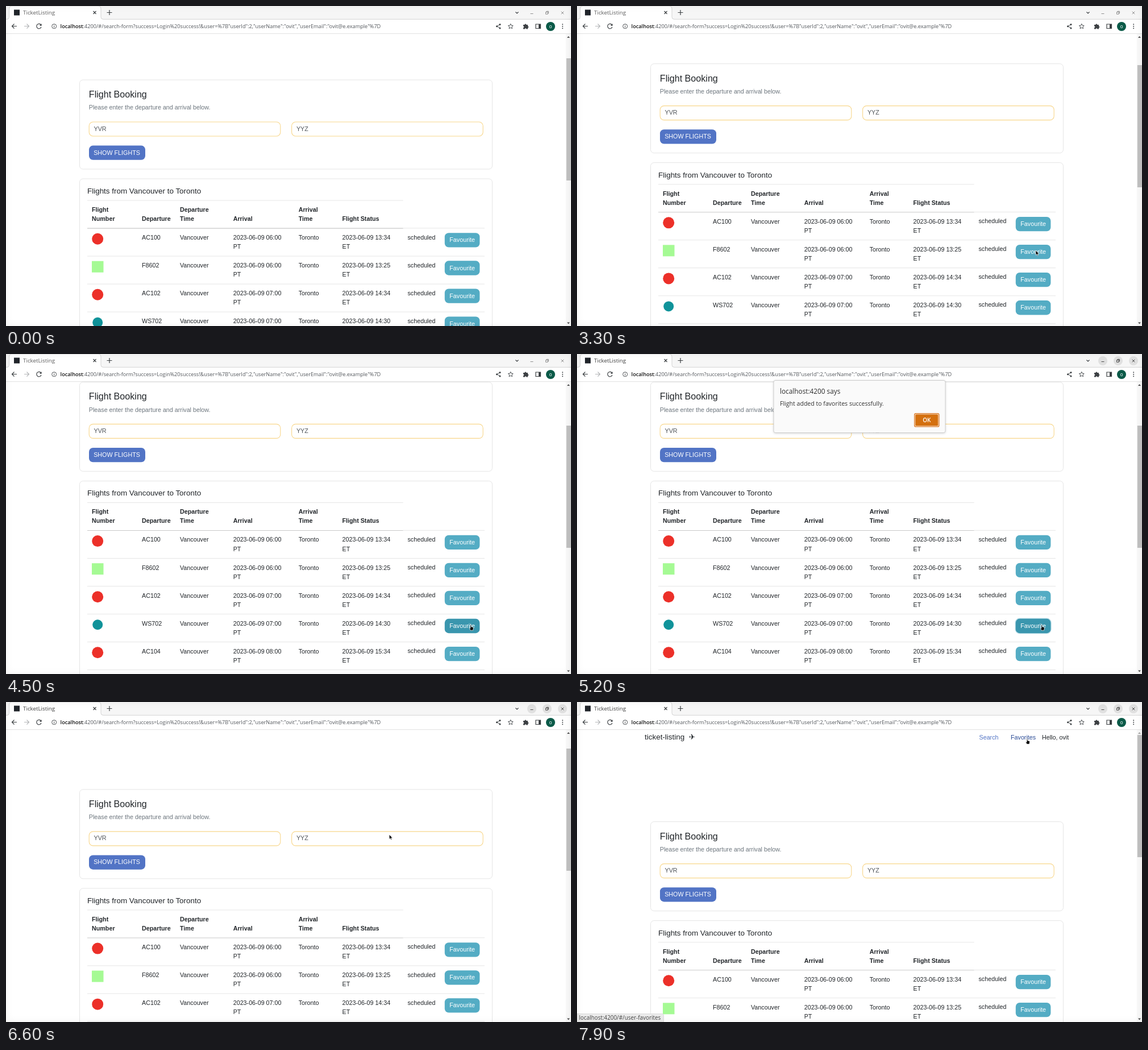
An HTML page for the animation above (8 s loop, 994x563 px).

```html
<!DOCTYPE html>
<html lang="en">
<head>
<meta charset="utf-8">
<title>TicketListing</title>
<style>
html, body { margin: 0; width: 100%; height: 100%; overflow: hidden; background: #fff; }
/* soft shading along the stage edges */
body::after { content: ""; position: fixed; inset: 0; box-shadow: inset 0 0 14px rgba(0, 0, 0, .06); pointer-events: none; }
svg { display: block; }
text { white-space: pre; }
#page { font: 10.74px "Liberation Sans", Arial, sans-serif; fill: #212529; }
#chrome, #dialog, #status { font: 9.17px "Open Sans", "Noto Sans", sans-serif; }
.line { fill: none; stroke: #3c4043; stroke-width: 1.2; }
.rule { stroke: #e0e0e0; stroke-width: .8; }
.card { fill: #fff; stroke: #e2e2e2; stroke-width: .9; }
.field { fill: #fff; stroke: #f8d78c; stroke-width: 1.1; }
</style>
</head>
<body>
<svg width="994" height="563" viewBox="0 0 994 563">
  <rect width="994" height="563" fill="#fff"/>
  <g id="page"></g>
  <g id="bar">
    <rect x="985" y="49" width="9" height="514" fill="#f8f8f8"/>
    <path id="up" d="M987 56l2.500-3 2.500 3z"/>
    <path d="M987 556.500l2.500 3 2.500-3z" fill="#505050"/>
    <rect id="thumb" x="985.800" width="8.200" height="215" fill="#c1c1c1"/>
  </g>
  <g id="chrome"></g>
  <g id="dialog">
    <rect x="346" y="47" width="302" height="92.500" rx="3" fill="#000" opacity=".18" style="filter:blur(2px)"/>
    <rect x="346" y="46.500" width="302" height="92" rx="3" fill="#fafafa" stroke="#c4c4c4" stroke-width=".8"/>
    <text x="357" y="69.700" font-size="11.8" fill="#2e2e2e">localhost:4200 says</text>
    <text x="357" y="90.600" font-size="10.57" fill="#333">Flight added to favorites successfully.</text>
    <rect id="okRing" x="593.700" y="104.700" width="43.200" height="23.200" rx="2.500" fill="#fff" stroke="#dc7d2c" stroke-width="1.400"/>
    <rect x="595.200" y="106.200" width="40.200" height="20.200" rx="1.500" fill="#d4700f"/>
    <text x="615.300" y="120" font-size="10" font-weight="600" fill="#fff" text-anchor="middle">OK</text>
  </g>
  <g id="status">
    <path d="M0 548.500H150q2.500 0 2.500 2.500V563H0z" fill="#ebebeb" stroke="#d4d4d4" stroke-width=".7"/>
    <text x="3.500" y="559" font-size="9.9" fill="#444">localhost:4200/#/user-favorites</text>
  </g>
  <g id="cursor" stroke="#fff" stroke-width=".7" stroke-linejoin="round">
    <path id="arrow" d="M0 0V8.200L1.900 6.500L3.100 9.200L4.500 8.600L3.300 6H5.900Z"/>
    <path id="hand" d="M-.8 .5Q0 -.6 .8 .5V3.300L3.500 3.900Q4.500 4.200 4.400 5.300L3.900 9.600H-.6L-2.500 6.200Q-2.600 5 -.8 6Z"/>
  </g>
</svg>
<script>
const $ = id => document.getElementById(id);
const txt = (x, y, s, attrs = '') => `<text x="${x}" y="${y}" ${attrs}>${s}</text>`;
const box = (x, y, w, h, r, attrs) => `<rect x="${x}" y="${y}" width="${w}" height="${h}" rx="${r}" ${attrs}/>`;
const rule = (x1, x2, y, attrs = '') => `<path class="rule" d="M${x1} ${y}H${x2}" ${attrs}/>`;

// Page, laid out for scroll position 0
const STEP = 80.6, ROW = 49.05, LINE = 16.1, TOP = 491.7;
const BLUE = '#5274c5', TEAL = '#54acc4', TEAL_DARK = '#3a96ae', RED = '#ec3029';
const COLS = [151, 239, 306, 399.7, 514.7, 591.5, 706.5];
const ROWS = [
  ['AC100', '06:00', '13:34'], ['F8602', '06:00', '13:25'], ['AC102', '07:00', '14:34'],
  ['WS702', '07:00', '14:30'], ['AC104', '08:00', '15:34'],
];
const HEADS = [['Flight', 'Number'], ['', 'Departure'], ['Departure', 'Time'],
  ['', 'Arrival'], ['Arrival', 'Time'], ['', 'Flight Status']];

function badge(code, y) {
  if (code[0] === 'F') return box(151, y - 10, 20.5, 20, 0, 'fill="#a5fa94"');
  const teal = code[0] === 'W';
  return `<circle cx="161.200" cy="${y}" r="${teal ? 9 : 10}" fill="${teal ? '#10939a' : RED}"/>`;
}

function flight([code, leave, land], i) {
  const y = TOP + i * ROW, cell = (c, s, dy = 0) => txt(COLS[c], y + dy, s);
  return badge(code, y - 1.4) + cell(1, code) + cell(2, 'Vancouver') +
    cell(3, '2023-06-09 ' + leave) + cell(3, 'PT', LINE) + cell(4, 'Toronto') +
    cell(5, '2023-06-09 ' + land) + cell(5, 'ET', LINE) + cell(6, 'scheduled', -.5) +
    box(770.6, y - 13.1, 64, 27.8, 8, `id="ring${i}" fill="#b9dde7"`) +
    box(771.8, y - 11.8, 61.6, 25.3, 7, `id="fav${i}"`) +
    txt(780.3, y + 4.4, 'Favourite', 'fill="#fff"') + rule(143, 842, y + 29);
}

$('page').innerHTML =
  txt(119, 66.3, 'ticket-listing', 'font-size="13.45"') +
  txt(196.8, 66, '✈', 'font-size="13.5" font-family="DejaVu Sans, sans-serif"') +
  txt(707.5, 65.8, 'Search', `fill="${BLUE}"`) + txt(763, 65.8, 'Favorites', 'id="link"') +
  txt(818, 65.8, 'Hello, ovit') +
  box(129.5, 210.6, 726, 157, 6, 'class="card"') +
  txt(145.8, 241.6, 'Flight Booking', 'font-size="16.1"') +
  txt(145.8, 263, 'Please enter the departure and arrival below.', 'fill="#6c757d"') +
  [['YVR', 146.2], ['YYZ', 502.6]].map(([s, x]) =>
    box(x, 284.6, 336.6, 25, 7, 'class="field"') + txt(x + 8.3, 300.2, s, 'fill="#4f5459"')).join('') +
  box(146, 326.2, 99, 25.2, 7, `fill="${BLUE}"`) + txt(154.2, 342.2, 'SHOW FLIGHTS', 'fill="#fff"') +
  box(129.5, 384.6, 726, 420, 6, 'class="card"') +
  txt(143, 410.7, 'Flights from Vancouver to Toronto', 'font-size="13.43"') +
  rule(143, 698.7, 422.7) + rule(143, 698.7, 471.7, 'style="stroke:#c9c9c9;stroke-width:1.1"') + rule(698.7, 842, 471.5) +
  '<g font-weight="bold">' + HEADS.map((pair, c) =>
    pair.map((s, k) => txt(COLS[c], 442.6 + k * LINE, s)).join('')).join('') + '</g>' +
  ROWS.map(flight).join('');

// Browser frame
const URL_REST = ':4200/#/search-form?success=Login%20success!&amp;user=%7B"userId":2,' +
  '"userName":"ovit","userEmail":"ovit@e.example"%7D';
const dots = (x, ys, r) => ys.map(y => `<circle cx="${x}" cy="${y}" r="${r}" fill="#3c4043"/>`).join('');

$('chrome').innerHTML =
  box(0, 0, 994, 48.5, 0, 'fill="#fff"') + box(0, 0, 994, 23, 0, 'fill="#f6f6f6"') +
  '<path d="M0 23.300H2q3.500 0 3.500-4V5q0-5 5-5H162q5 0 5 5V19.300q0 4 4 4H994" fill="#fff" stroke="#cfcfcf" stroke-width=".9"/>' +
  rule(0, 994, 48.6, 'style="stroke:#dadada"') +
  box(14, 6.5, 10, 10, 0, 'fill="#20242a"') +
  txt(30, 15.2, 'TicketListing', 'id="tab" font-size="9.8"') +
  '<path class="line" d="M153.500 9l5 5m0-5l-5 5M177.500 11.500h9m-4.500-4.500v9M896.500 10.500l2.500 2.500 2.500-2.500"/>' +
  '<g id="discs" fill="#e0e0e0">' + [925, 952, 979].map(x => `<circle cx="${x}" cy="12" r="8"/>`).join('') + '</g>' +
  '<path id="controls" fill="none" stroke-width=".9" d="M922.500 13.500h5M949.500 10.700h3.600v3.600h-3.600zM951 10.500V9.300h3.500v3.600h-1.200M976.700 9.700l4.600 4.600m0-4.600l-4.600 4.600"/>' +
  '<path class="line" d="M19 35.500H10.500m4-4l-4 4 4 4M61.500 33.200A4.200 4.200 0 1 0 62 37"/>' +
  '<path d="M62.600 31v3.800h-3.800z" fill="#3c4043"/>' +
  '<path class="line" style="stroke:#b4b6b8" d="M32 35.500h8.500m-4-4l4 4-4 4"/>' +
  '<circle class="line" style="stroke-width:.9" cx="84.700" cy="35.700" r="4"/><path class="line" style="stroke-width:1" d="M84.700 35.200v2.600m0-4.400v1"/>' +
  txt(95.6, 39, `<tspan fill="#111" font-weight="600">localhost</tspan>${URL_REST}`, 'fill="#53575c"') +
  '<path class="line" style="stroke-width:.9" d="M869 32.700l-5.500 3 5.500 3"/>' +
  '<g fill="#3c4043"><circle cx="869" cy="32.500" r="1.500"/><circle cx="863.500" cy="35.700" r="1.500"/><circle cx="869" cy="38.900" r="1.500"/></g>' +
  '<path class="line" style="stroke-width:.9" d="M887.800 31.300l1.300 2.900 3.100.3-2.300 2.100.7 3.100-2.800-1.600-2.800 1.600.7-3.100-2.300-2.100 3.100-.3z"/>' +
  '<path fill="#3c4043" d="M910 33h2.500a1.400 1.400 0 1 1 2.800 0h2.700v2.600a1.400 1.400 0 1 1 0 2.800v2.200h-2.600a1.300 1.300 0 0 0-2.600 0H910v-2.600a1.300 1.300 0 0 0 0-2.600z"/>' +
  '<path class="line" d="M932 32h8.500v7.500H932z"/><path fill="#3c4043" d="M937 32h3.500v7.500H937z"/>' +
  '<circle cx="958" cy="36" r="8" fill="#0a5a48"/>' + txt(958, 38.7, 'o', 'fill="#fff" font-size="8.5" text-anchor="middle"') +
  dots(979.2, [32.2, 35.7, 39.2], .95);

// Motion: eased tracks of [time, ...values]
const POINTER = [
  [500, 160, 284], [1000, 791, 379], [1100, 791, 379], [1400, 784.5, 369.5], [1900, 784.5, 369.5],
  [2000, 785, 365], [2700, 807, 430], [3700, 807, 430], [4500, 817.8, 476.6], [5300, 817.8, 476.6],
  [6200, 614, 118], [6300, 617.5, 121.8], [6700, 684.7, 253.8], [6800, 684.7, 253.8],
  [7100, 701.5, 143], [7600, 792, 64.5],
];
const SCROLL = [[3100, STEP], [3600, 2 * STEP], [6300, 2 * STEP], [6800, 0]];
const DIALOG = [[4800, 0], [5100, 1], [6200, 1], [6300, .5], [6400, 0]];
const STATUS = [[7700, 0], [7900, 1]];

function at(track, t) {
  const k = track.findIndex(p => p[0] > t);
  if (k < 1) return track[k < 0 ? track.length - 1 : 0].slice(1);
  const [a, b] = [track[k - 1], track[k]], u = (t - a[0]) / (b[0] - a[0]), e = u * u * (3 - 2 * u);
  return a.slice(1).map((v, i) => v + (b[i + 1] - v) * e);
}

const set = (id, name, value) => $(id).setAttribute(name, value);
const show = (id, on) => set(id, 'opacity', +on);

function draw(t) {
  const [x, y] = at(POINTER, t), [scroll] = at(SCROLL, t), [alpha] = at(DIALOG, t);
  const live = t >= 500 && t < 3200 || t >= 3800 && t < 5400 || t >= 7100;
  const focused = t >= 4800;
  let hand = false;

  ROWS.forEach((_, i) => {
    const top = TOP + i * ROW - 11.7 - scroll;
    const over = live && x > 772 && x < 833 && y > top && y < top + 25;
    hand ||= over;
    set('fav' + i, 'fill', over ? TEAL_DARK : TEAL);
    show('ring' + i, focused && i === 3);
  });
  const overLink = live && t >= 7100 && x > 763 && x < 807 && y > 56 && y < 70;
  hand ||= overLink;
  set('link', 'fill', overLink ? '#2b4c96' : BLUE);

  set('page', 'transform', `translate(0 ${-scroll})`);
  set('thumb', 'y', 58 + scroll * 34 / STEP);
  set('up', 'fill', scroll < 1 ? '#a3a3a3' : '#505050');

  show('discs', focused);
  set('controls', 'stroke', focused ? '#3d3d3d' : '#858585');
  set('tab', 'fill', focused ? '#3d3d3d' : '#5c5c5c');

  const closing = t >= 6300;
  set('dialog', 'opacity', alpha);
  set('dialog', 'transform', `translate(${closing ? .5 : 0} ${closing ? -8 : -8 * (1 - alpha)})`);
  show('okRing', !closing);
  set('status', 'opacity', at(STATUS, t)[0]);

  show('cursor', t >= 500);
  set('cursor', 'transform', `translate(${x} ${y})`);
  show('arrow', !hand);
  show('hand', hand);
}

const start = performance.now();
function tick() {
  draw(Math.floor((performance.now() - start) % 8000 / 100) * 100);
  requestAnimationFrame(tick);
}
tick();
</script>
</body>
</html>
```
